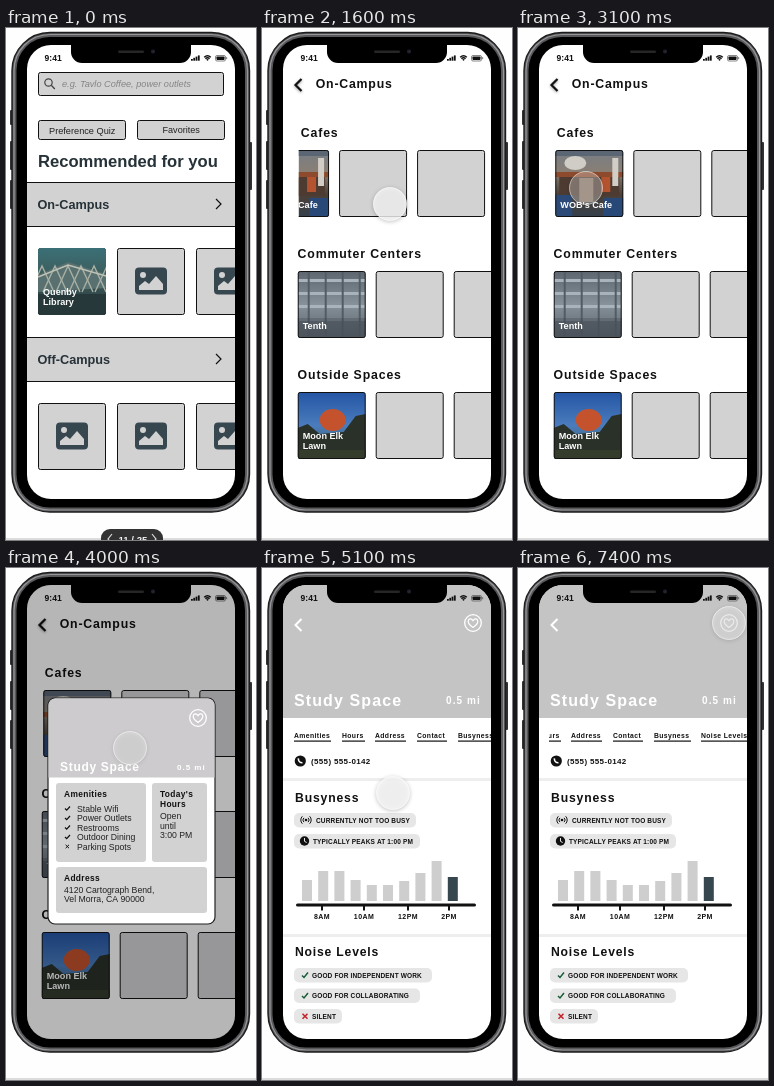
Recreate the animation shown at these times as an HTML page with a canvas. Size 250 by 512 pixels, loop 7.7 s.

```html
<!DOCTYPE html>
<html lang="en">
<head>
<meta charset="utf-8">
<title>Study space prototype</title>
<style>
  html, body { margin: 0; width: 100%; height: 100%; overflow: hidden; background: #fff; }
  canvas { display: block; width: 250px; height: 512px; }
</style>
</head>
<body>
<canvas id="stage"></canvas>
<script>
const LOOP = 7700;
const INK = '#111', SLATE = '#37474f', GREY = '#d3d2d3';
const SCREEN = [21, 17, 208, 454];
const canvas = document.getElementById('stage');
const ratio = window.devicePixelRatio || 1;
canvas.width = 250 * ratio;
canvas.height = 512 * ratio;
const c = canvas.getContext('2d');

// Eased value of a list of [time, value] stops
function track(t, stops) {
  let prev = stops[0];
  for (const next of stops) {
    if (t < next[0]) {
      if (next === prev) return prev[1];
      const u = (t - prev[0]) / (next[0] - prev[0]);
      return prev[1] + (next[1] - prev[1]) * u * u * (3 - 2 * u);
    }
    prev = next;
  }
  return prev[1];
}

function text(s, x, y, size, spacing = 0, color = INK, style = 'bold') {
  c.font = `${style} ${size}px "Liberation Sans", Arial, sans-serif`;
  c.letterSpacing = spacing + 'px';
  c.fillStyle = color;
  c.fillText(s, x, y);
}

function rect(x, y, w, h, color) {
  c.fillStyle = color;
  c.fillRect(x, y, w, h);
}

function box(x, y, w, h, r, fill, stroke, width = 1) {
  c.beginPath();
  c.roundRect(x, y, w, h, r);
  if (fill) { c.fillStyle = fill; c.fill(); }
  if (stroke) { c.strokeStyle = stroke; c.lineWidth = width; c.stroke(); }
}

function line(points, color, width = 1, fill) {
  c.beginPath();
  points.forEach(([x, y]) => c.lineTo(x, y));
  if (fill) { c.fillStyle = fill; c.fill(); }
  if (color) { c.strokeStyle = color; c.lineWidth = width; c.stroke(); }
}

function disc(x, y, r, fill, stroke, width = 1) {
  c.beginPath();
  c.arc(x, y, r, 0, 7);
  if (fill) { c.fillStyle = fill; c.fill(); }
  if (stroke) { c.strokeStyle = stroke; c.lineWidth = width; c.stroke(); }
}

function oval(x, y, rx, ry, fill) {
  c.beginPath();
  c.ellipse(x, y, rx, ry, 0, 0, 7);
  c.fillStyle = fill;
  c.fill();
}

function clipped(x, y, w, h, r, draw) {
  c.save();
  c.beginPath();
  c.roundRect(x, y, w, h, r);
  c.clip();
  draw();
  c.restore();
}

function faded(alpha, draw) {
  if (alpha <= 0) return;
  c.save();
  c.globalAlpha *= alpha;
  draw();
  c.restore();
}

function shadowed(color, blur, draw) {
  c.save();
  c.shadowColor = color;
  c.shadowBlur = blur * ratio;
  c.shadowOffsetY = ratio;
  draw();
  c.restore();
}

function gradient(y, colors) {
  const g = c.createLinearGradient(0, y, 0, y + 67);
  colors.forEach((color, i) => g.addColorStop(i / (colors.length - 1), color));
  return g;
}

const chevron = (x, y, dx, color, width, half = 5) =>
  line([[x, y - half], [x + dx, y], [x, y + half]], color, width);

const check = (x, y, color, width = 1.2) =>
  line([[x, y], [x + 2, y + 2], [x + 6, y - 3]], color, width);

function cross(x, y, s, color, width = 1.2) {
  line([[x - s, y - s], [x + s, y + s]], color, width);
  line([[x + s, y - s], [x - s, y + s]], color, width);
}

function card(x, y) {
  box(x + .5, y + .5, 67, 66, 2, GREY, INK);
}

function photo(x, y, colors, draw, labels) {
  clipped(x, y, 68, 67, 3, () => {
    rect(x, y, 68, 67, gradient(y, colors));
    c.save();
    c.translate(x, y);
    draw();
    c.restore();
  });
  const last = labels.length - 1;
  labels.forEach((s, i) => text(s, x + 5, y + 58 - 10 * (last - i) - last, 9.1, 0, '#fff'));
}

function libraryScene() {
  line([[0, 27], [30, 14], [68, 26], [68, 40], [0, 44]], null, 0, '#58706f');
  for (let x = -8; x < 70; x += 13)
    line([[x, 44], [x + 12, 18], [x + 24, 44]], '#a8afa3', 1.4);
  line([[0, 29], [30, 17], [68, 28]], '#bfc3b6', 1.5);
  rect(0, 46, 68, 21, '#26383a');
}

function cafeScene() {
  rect(0, 0, 68, 6, '#5a6673');
  rect(0, 22, 68, 5, '#8d4a2c');
  rect(4, 27, 60, 19, '#4d3a30');
  rect(24, 28, 14, 24, '#8a7462');
  rect(46, 27, 9, 15, '#b4532f');
  rect(57, 8, 6, 28, '#d2cdc6');
  oval(20, 13, 11, 7, '#cfcdc6');
  rect(0, 45, 17, 22, '#2b4a78');
  rect(48, 48, 20, 19, '#284878');
}

function officeScene() {
  for (let i = 0; i < 4; i++) rect(0, 8 + i * 13, 68, 3, '#a9b3bb');
  for (let i = 0; i < 4; i++) rect(10 + i * 17, 0, 2, 67, '#535c64');
  rect(0, 47, 68, 20, 'rgba(70,78,86,.7)');
}

function lawnScene() {
  line([[0, 36], [10, 32], [22, 42], [46, 40], [58, 24], [68, 22], [68, 67], [0, 67]], null, 0, '#2a3128');
  rect(0, 58, 68, 9, '#343c2c');
  oval(35, 28, 13, 11, '#c4532d');
}

function statusBar() {
  text('9:41', 38.6, 32.7, 8.5);
  for (let i = 0; i < 4; i++) rect(185 + i * 2.3, 31 - i * 1.2, 1.8, 1.7 + i * 1.2, INK);
  for (const r of [1.2, 3.2, 5]) {
    c.beginPath();
    c.arc(201.5, 33, r, -2.3, -.84);
    c.strokeStyle = INK;
    c.lineWidth = 1.4;
    c.stroke();
  }
  box(209.5, 27.5, 10, 5.5, 1.5, null, '#555', .7);
  box(210.5, 28.5, 8, 3.5, .7, INK);
  rect(220.3, 29.2, .8, 2, '#555');
}

function pictureIcon(x, y) {
  box(x - 16, y - 13.5, 32, 27, 4, SLATE);
  disc(x - 8, y - 6, 3, GREY);
  line([[x - 12, y + 9], [x - 12, y + 5], [x - 6, y], [x - 2, y + 3], [x + 5, y - 5], [x + 12, y + 3], [x + 12, y + 9]], null, 0, GREY);
}

function homePage() {
  rect(...SCREEN, '#fff');
  box(32.5, 44.5, 185, 23, 2, GREY, INK);
  disc(42.5, 54.5, 3.7, null, '#444', 1.2);
  line([[45.3, 57.3], [48.8, 61]], '#444', 1.3);
  text('e.g. Tavlo Coffee, power outlets', 56, 59, 9.2, 0, '#858585', 'italic');
  box(32.5, 92.5, 87, 19, 2, GREY, INK);
  box(131.5, 92.5, 87, 19, 2, GREY, INK);
  text('Preference Quiz', 43, 105.5, 9.2, 0, '#222', 'normal');
  text('Favorites', 156.5, 105, 9.1, 0, '#222', 'normal');
  text('Recommended for you', 32, 139, 16.6, 0, '#263238');
  [['On-Campus', 154], ['Off-Campus', 309]].forEach(([title, y]) => {
    box(20.5, y + .5, 209, 44, 0, GREY, INK);
    text(title, 31.5, y + 27, 12.7, 0, '#263238');
    chevron(210, y + 22, 5, INK, 1.2);
    for (let i = 0; i < 3; i++) {
      card(32 + i * 79, y + 66);
      pictureIcon(66 + i * 79, y + 99);
    }
  });
  photo(32, 220, ['#3b7077', '#3d5857', '#22343a'], libraryScene, ['Quenby', 'Library']);
}

function campusPage(t) {
  rect(...SCREEN, '#fff');
  shadowed('rgba(0,0,0,.4)', 3, () => chevron(39.5, 57, -6, INK, 2.2, 6));
  text('On-Campus', 53.7, 60, 12.3, .8);
  const scroll = track(t, [[1350, 0], [1850, -76], [2000, -76], [2700, 0]]);
  const rows = [
    ['Cafes', 38.8, 37.3, 122, scroll, ['#767d86', '#8a7f74', '#4b4038', '#35404b'], cafeScene, ["WOB's Cafe"]],
    ['Commuter Centers', 35.6, 35.7, 243, 0, ['#5d666e', '#86919a', '#59626b'], officeScene, ['Tenth']],
    ['Outside Spaces', 35.6, 35.7, 364, 0, ['#2455a4', '#4a7cbd', '#3d5440'], lawnScene, ['Moon Elk', 'Lawn']]
  ];
  for (const [title, titleX, x, y, shift, colors, scene, labels] of rows) {
    text(title, titleX, y - 13.5, 12.3, .85);
    clipped(x - .5, y - 1, 230 - x, 70, 0, () => {
      for (let i = 1; i < 5; i++) card(x + shift + i * 78, y);
      photo(x + shift, y, colors, scene, labels);
      box(x + shift + .5, y + .5, 67, 66, 2, null, INK);
    });
  }
}

function heart(x, y) {
  disc(x, y, 8.3, null, '#fff', 1.3);
  c.beginPath();
  c.moveTo(x, y + 4.5);
  c.bezierCurveTo(x - 9, y - 1.5, x - 3, y - 7, x, y - 2.3);
  c.bezierCurveTo(x + 3, y - 7, x + 9, y - 1.5, x, y + 4.5);
  c.lineWidth = 1.2;
  c.stroke();
}

function infoCards() {
  const item = (s, x, y) => text(s, x, y, 8.7, 0, '#222', 'normal');
  const title = (s, x, y) => text(s, x, y, 8.4, .35);
  box(50, 215, 90, 79, 3, GREY);
  box(146, 215, 55, 79, 3, GREY);
  box(50, 299, 151, 46, 3, GREY);
  title('Amenities', 58, 229);
  ['Stable Wifi', 'Power Outlets', 'Restrooms', 'Outdoor Dining', 'Parking Spots'].forEach((s, i) => {
    const y = 243.5 + i * 9.5;
    if (i < 4) line([[59, y - 3], [60.7, y - 1.3], [64, y - 5]], INK, 1.2);
    else cross(61.3, y - 3, 1.7, INK, 1);
    item(s, 71, y);
  });
  title("Today's", 154, 229);
  title('Hours', 154, 239);
  ['Open', 'until', '3:00 PM'].forEach((s, i) => item(s, 154, 251 + i * 9.7));
  title('Address', 58, 313);
  item('4120 Cartograph Bend,', 58, 325);
  item('Vel Morra, CA 90000', 58, 334);
}

function modal() {
  rect(...SCREEN, 'rgba(0,0,4,.285)');
  box(42, 130, 167, 226, 7, '#fff', '#222', 1.2);
  clipped(42.5, 130.5, 166, 79, [7, 7, 0, 0], () => rect(42, 130, 167, 80, '#cdcbcd'));
  heart(192, 150);
  text('Study Space', 54, 203, 12, .7, '#fff');
  text('0.5 mi', 171, 202, 8, 1, '#fff');
  infoCards();
}

function pill(s, y, w, textX) {
  box(32, y, w, 14.5, 5, '#e7e6e7');
  text(s, textX, y + 9.7, 6.5, .15);
}

function detailContent() {
  c.save();
  c.translate(32, 4);
  c.scale(1.23, 1.23);
  c.translate(-50, -215);
  infoCards();
  c.restore();

  disc(38.3, 193, 5.6, INK);
  c.beginPath();
  c.arc(40.2, 191, 3.8, 1.5, 3.3);
  c.strokeStyle = '#fff';
  c.lineWidth = 1.6;
  c.stroke();
  text('(555) 555-0142', 49, 195.8, 8, .35);
  rect(21, 210, 208, 3, '#eee');

  text('Busyness', 33, 234, 12.2, .85);
  pill('CURRENTLY NOT TOO BUSY', 245, 122, 54);
  disc(44, 252, 1.3, INK);
  for (const r of [3, 5.2]) for (const a of [0, Math.PI]) {
    c.beginPath();
    c.arc(44, 252, r, a - .8, a + .8);
    c.strokeStyle = INK;
    c.lineWidth = 1;
    c.stroke();
  }
  pill('TYPICALLY PEAKS AT 1:00 PM', 266, 126, 51);
  disc(42.5, 273, 4.7, INK);
  line([[42.5, 270], [42.5, 273.3], [44.7, 274.5]], '#fff', .9);

  [21, 30, 30, 21, 16, 16, 20, 28, 40, 24].forEach((h, i) =>
    rect(40 + i * 16.2, 333 - h, 10, h, i === 9 ? SLATE : '#cfcecf'));
  box(34, 335.5, 180, 3, 1.5, INK);
  [['8AM', 60], ['10AM', 102], ['12PM', 146], ['2PM', 187]].forEach(([s, x]) => {
    rect(x - 1, 336, 2, 6.5, INK);
    c.textAlign = 'center';
    text(s, x, 351, 7, .4);
    c.textAlign = 'left';
  });
  rect(21, 366, 208, 3, '#eee');

  text('Noise Levels', 33, 388, 12.2, .8);
  pill('GOOD FOR INDEPENDENT WORK', 400, 138, 50);
  pill('GOOD FOR COLLABORATING', 420.5, 126, 50);
  pill('SILENT', 441, 48, 50);
  check(40, 407.5, '#185c35', 1.5);
  check(40, 428, '#185c35', 1.5);
  cross(43, 448.3, 2.5, '#c3272b', 1.6);
}

function detailPage(t) {
  rect(...SCREEN, '#fff');
  const scroll = track(t, [[4650, 184], [5100, 0]]);
  clipped(21, 178, 208, 293, 0, () => {
    c.translate(0, scroll);
    detailContent();
  });
  rect(21, 17, 208, 133, '#c5c4c5');
  chevron(39.5, 57, -6, '#fff', 2, 6);
  heart(211, 55);
  text('Study Space', 32, 138, 16, 1.1, '#fff');
  text('0.5 mi', 184, 136, 10, 1.1, '#fff');
  const shift = track(t, [[5450, 0], [5820, -60]]);
  clipped(31, 155, 198, 23, 0, () => {
    const tabs = [['Amenities', 32, 37], ['Hours', 80, 23], ['Address', 113, 31],
      ['Contact', 155, 30], ['Busyness', 196, 37], ['Noise Levels', 243, 48]];
    for (const [s, x, w] of tabs) {
      text(s, x + shift, 169.5, 6.8, .4);
      rect(x + shift, 172.5, w, 1.2, INK);
    }
  });
}

function phoneBody() {
  for (const [x, y, h] of [[4, 82, 15], [4, 113, 29], [4, 152, 29], [243.5, 114, 48]])
    box(x, y, 2.5, h, 1, '#333');
  box(6, 4.5, 237.5, 479.5, 38, '#59585b', '#1c1c1d', 1.4);
  box(8, 6.5, 233.5, 475.5, 36, null, '#98969a', 1.2);
  box(10.5, 9, 228.5, 470.5, 33, '#000');
}

function notch() {
  box(65, 15, 120, 20, [0, 0, 11, 11], '#000');
  box(112, 22.5, 26, 2.5, 1.2, '#262626');
  disc(147, 23.5, 2, '#20232f');
}

function pager() {
  box(95, 501, 62, 24, 9, '#333');
  text('11 / 25', 112.5, 514.5, 9.6, 0, '#f2f2f2');
  chevron(106, 511, -4, '#ddd', 1.2);
  chevron(146, 511, 4, '#ddd', 1.2);
}

// time, x, y, opacity
const pointerStops = [
  [400, 228, 534, .8], [1050, 128, 176, .8], [2750, 128, 176, .75], [3050, 68, 160, .3],
  [3450, 68, 160, .3], [3850, 124, 180, .35], [4250, 124, 180, .35], [4500, 131, 225, .8],
  [5350, 131, 225, .8], [5550, 118, 165, .8], [6050, 118, 165, .8], [6800, 211, 55, .8],
  [6900, 211, 55, .45]
];

function pointer(t) {
  const [x, y, alpha] = [1, 2, 3].map(k => track(t, pointerStops.map(s => [s[0], s[k]])));
  shadowed('rgba(0,0,0,.3)', 4, () => disc(x, y, 16.8, `rgba(250,250,250,${alpha})`));
  disc(x, y, 16.5, null, 'rgba(255,255,255,.5)', .9);
}

function render(t) {
  c.setTransform(ratio, 0, 0, ratio, 0, 0);
  rect(0, 0, 250, 512, '#fefefe');
  rect(0, 510.5, 250, 1, '#bbb');
  faded(track(t, [[1300, 1], [1550, 0]]), pager);
  phoneBody();
  clipped(...SCREEN, 24, () => {
    const toCampus = track(t, [[1150, 0], [1350, 1]]);
    const toDetail = track(t, [[4020, 0], [4220, 1]]);
    if (toCampus < 1) homePage();
    if (toDetail < 1) {
      faded(toCampus, () => campusPage(t));
      statusBar();
      faded(track(t, [[3150, 0], [3350, 1]]), modal);
    }
    faded(toDetail, () => {
      detailPage(t);
      statusBar();
    });
  });
  notch();
  pointer(t);
}

const start = performance.now();
(function tick() {
  render((performance.now() - start) % LOOP);
  requestAnimationFrame(tick);
})();
</script>
</body>
</html>
```
